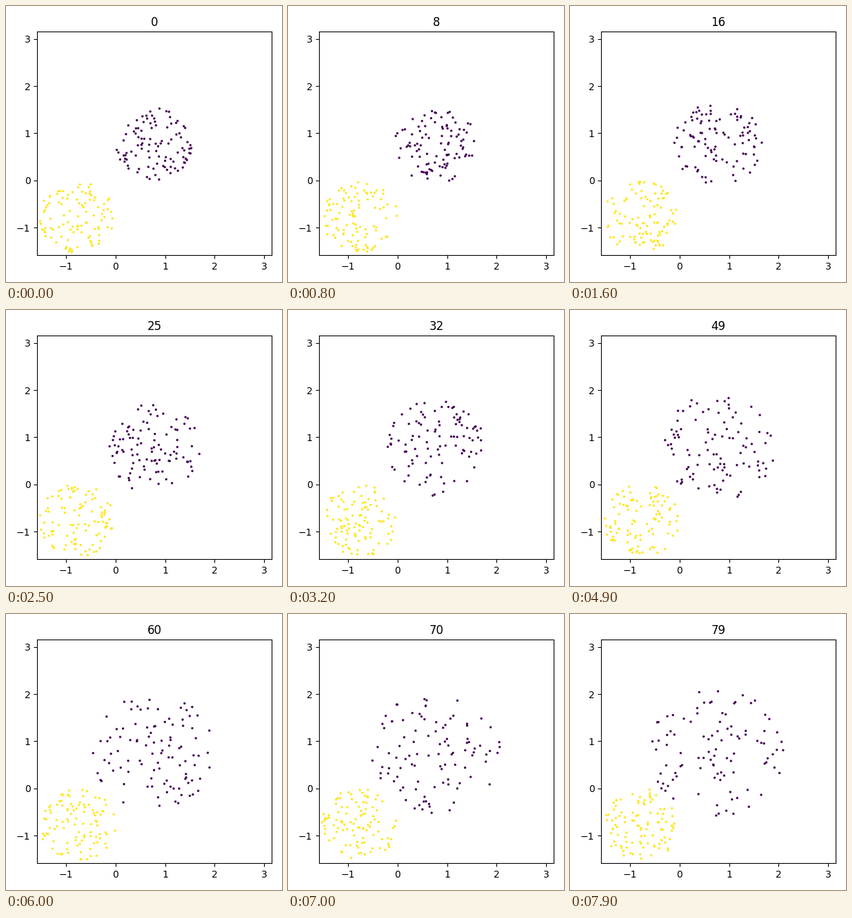
A matplotlib script for the animation above (8 s loop, 400 px wide and 400 px high).

```python
import matplotlib.pyplot as plt
import numpy as np
from matplotlib.animation import FuncAnimation

FRAMES = 80
COUNT = 100
CENTER = 0.77
RADIUS = 0.77
GROWTH = 0.0077  # radius gained by the upper cluster per step


def disc(rng, center, radius):
    """Points spread evenly over a disc centred on the diagonal."""
    r = radius * np.sqrt(rng.random(COUNT))
    a = 2 * np.pi * rng.random(COUNT)
    return np.column_stack((center + r * np.cos(a), center + r * np.sin(a)))


def sample(step):
    rng = np.random.default_rng(step)
    return np.vstack((disc(rng, CENTER, RADIUS + GROWTH * step),
                      disc(rng, -CENTER, RADIUS)))


fig, ax = plt.subplots(figsize=(4, 4), dpi=100)
fig.subplots_adjust(left=0.1131, right=0.9625, bottom=0.0975, top=0.9065)

labels = np.repeat([0, 1], COUNT)
dots = ax.scatter(*sample(0).T, c=labels, cmap="viridis", s=2)
ax.set(xlim=(-1.585, 3.152), ylim=(-1.585, 3.152))
title = ax.set_title("0")


def update(step):
    dots.set_offsets(sample(step))
    title.set_text(str(step))
    return dots, title


anim = FuncAnimation(fig, update, frames=FRAMES, interval=100,
                     repeat=True, repeat_delay=0)
plt.show()
```
